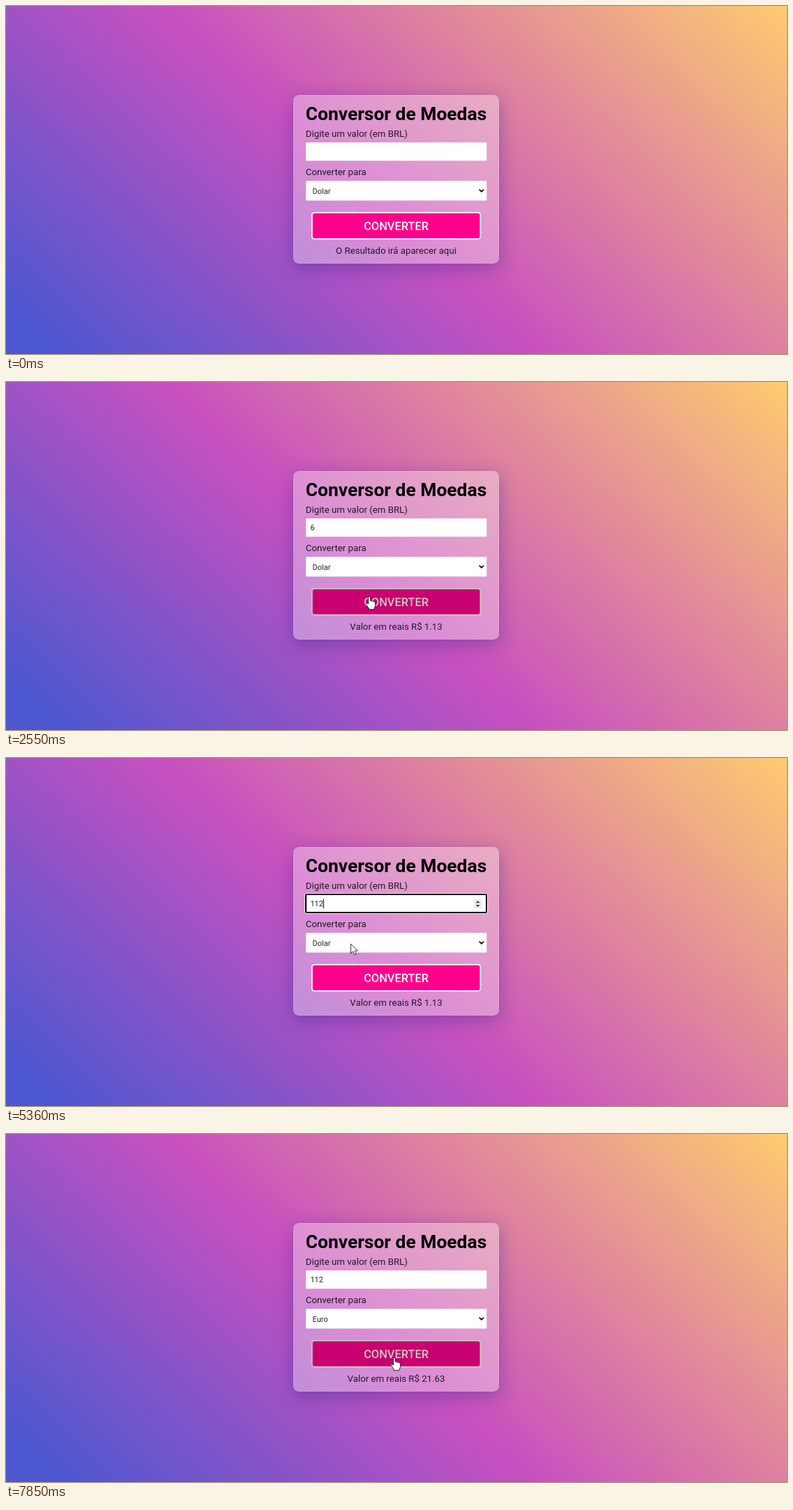
An HTML page that plays this animation: 1120x500 px, repeating every 8 s.

```html
<!DOCTYPE html>
<html lang="pt-BR">
<head>
<meta charset="utf-8">
<title>Conversor de Moedas</title>
<style>
  html, body { margin: 0; width: 100%; height: 100%; overflow: hidden; }
  #stage {
    position: relative; width: 1120px; height: 500px; overflow: hidden;
    background: linear-gradient(43deg, #4d57cf 5%, #c850c0 46%, #fdc971 99%);
  }
  #card {
    position: absolute; left: 412px; top: 128px; width: 295px; height: 242px;
    box-sizing: border-box; border: 1px solid rgba(255, 255, 255, .18); border-radius: 8.2px;
    background: rgba(255, 255, 255, .35);
    box-shadow: 0 6.6px 26px rgba(31, 38, 135, .37);
  }
  svg { position: absolute; left: 0; top: 0; }
  text { font: 13.24px Roboto, sans-serif; fill: rgba(0, 0, 0, .84); }
  .title { font-size: 26.4px; font-weight: 700; fill: #000; }
  .field { font-size: 11px; fill: #222; }
  .action { font-size: 16.4px; font-weight: 500; fill: #fff; }
  .mid { text-anchor: middle; }
  .picked { fill: #fff; font-weight: 500; }
  .focus { fill: none; stroke: #000; stroke-width: 2; }
  .halo { fill: none; stroke: #fff; stroke-opacity: .7; }
  #list { filter: drop-shadow(0 1px 1.5px rgba(0, 0, 0, .45)); }
</style>
</head>
<body>
<div id="stage">
  <div id="card"></div>
  <svg width="1120" height="500" viewBox="0 0 1120 500">
    <text class="title" x="429.8" y="163.6">Conversor de Moedas</text>
    <text x="429.8" y="187.6">Digite um valor (em BRL)</text>
    <rect x="430" y="196" width="259.3" height="26.3" fill="#fff"/>
    <rect id="selection" x="436.3" y="202.5" width="6.6" height="13.5" fill="#0078d7"/>
    <text id="amount" class="field" x="436.4" y="213.3"></text>
    <g id="inputFocus">
      <rect class="halo" x="428.5" y="194.5" width="262" height="29" rx="2.5"/>
      <rect class="focus" x="430" y="196" width="259" height="26" rx="1.2"/>
      <rect x="671" y="203" width="11.5" height="13" fill="#ececf0"/>
      <path d="M673.6 208.2L676.6 205L679.6 208.2ZM673.6 211L676.6 214.2L679.6 211Z" fill="#444"/>
      <rect id="caret" y="202.5" width="1" height="13.5"/>
    </g>

    <text x="429.8" y="243">Converter para</text>
    <rect x="430" y="251.2" width="259.3" height="28.3" fill="#fff"/>
    <text id="currency" class="field" x="439.6" y="269.6"></text>
    <path d="M678.7 263.7l3.2 3.2l3.2-3.2" fill="none" stroke="#000" stroke-width="1.7"/>
    <g id="selectFocus">
      <rect class="halo" x="428.5" y="250.5" width="262" height="30" rx="2.5"/>
      <rect class="focus" x="430" y="252" width="259" height="27" rx="1.2"/>
    </g>

    <g id="button">
      <rect x="438.8" y="296.8" width="241.6" height="37.9" rx="3.4" fill="#ff008c" stroke="#fff" stroke-width="1.7"/>
      <text class="action mid" x="559.6" y="321.8">CONVERTER</text>
    </g>
    <text id="result" class="mid" x="559.5" y="356.2"></text>

    <g id="list">
      <rect x="430" y="279.7" width="259" height="28.6" fill="#fff" stroke="#777" stroke-width=".6"/>
      <rect id="highlight" x="430.4" width="258.2" height="14.2" fill="#1e90ff"/>
      <text id="dollarOption" class="field" x="441" y="290.4">Dolar</text>
      <text id="euroOption" class="field" x="441" y="304.4">Euro</text>
    </g>

    <g id="cursor">
      <circle id="press" cy="-1" r="10" fill="#fff200" fill-opacity=".55"/>
      <path id="arrow" d="M0 0V13.8L3.2 10.9L5.3 15.7L7.7 14.7L5.6 10H10Z" fill="#fff" stroke="#000" stroke-width=".8"/>
      <path id="beam" d="M-3-6.5H-.7L0-5.9L.7-6.5H3M0-5.9V6M-3 6.6H-.7L0 6L.7 6.6H3" fill="none" stroke="#111" stroke-width="1.1"/>
      <path id="hand" d="M-1.5 1.6Q-1.5 0 0 0T1.5 1.6V6.4Q2.9 5.6 4 7Q5.4 6.2 6.3 7.6Q8.6 7.2 8.6 9.5V12.5Q8.6 15 7.2 16.5V18.7H-.8V17Q-2 15.8-3.2 13.5L-5 11Q-5.4 9.2-3.6 9.3L-1.5 11Z" fill="#fff" stroke="#111" stroke-width=".9"/>
    </g>
  </svg>
</div>
<script>
const LOOP = 8000, PRESS = 150, KEY_GAP = 67, BLINK = 500, FADE = 250, DIGIT = 6.14;
const el = Object.fromEntries([...document.querySelectorAll("[id]")].map(n => [n.id, n]));

// What the user does, and when
const at = {
  enter: 390, focus: 950, typeFirst: 1570, convert: 2330, refocus: 4000,
  drag: 4570, release: 4970, typeSecond: 5030, open: 6280, hoverEuro: 6550, pick: 6950, convertAgain: 7600
};
const clicks = [at.focus, at.convert, at.refocus, at.open, at.convertAgain];

// Pointer moves, each easing on from where the last one ended
const entry = { x: 951, y: 470 };
const moves = [
  { start: at.enter, ms: 560, x: 508.5, y: 213.5 },
  { start: 1640, ms: 560, x: 521, y: 308 },
  { start: 2880, ms: 250, x: 527, y: 331 },
  { start: 3130, ms: 510, x: 513, y: 256 },
  { start: 3700, ms: 300, x: 484, y: 214.5 },
  { start: at.drag, ms: 200, x: 421, y: 213.5 },
  { start: at.release, ms: 200, x: 494.5, y: 267 },
  { start: 6430, ms: 100, x: 490, y: 297 },
  { start: 6900, ms: 60, x: 495.5, y: 299 },
  { start: 7310, ms: 270, x: 557, y: 321 }
];

const between = (t, a, b) => t >= a && t < b;
const smooth = p => p * p * (3 - 2 * p);
const typed = (word, start, t) => word.slice(0, Math.max(0, Math.floor((t - start) / KEY_GAP) + 1));
const show = (node, on) => node.setAttribute("visibility", on ? "inherit" : "hidden");
const label = (node, s) => { if (node.textContent !== s) node.textContent = s; };
const listOpen = t => between(t, at.open, at.pick);

function pointer(t) {
  return moves.reduce((from, { start, ms, x, y }) => {
    const p = smooth(Math.min(1, Math.max(0, (t - start) / ms)));
    return { x: from.x + (x - from.x) * p, y: from.y + (y - from.y) * p };
  }, entry);
}

function pointerKind(t) {
  const { x, y } = pointer(t);
  if (between(t, at.drag, at.release)) return "beam";
  if (listOpen(t)) return "arrow";
  if (between(x, 430, 689) && between(y, 196, 222)) return "beam";
  return between(x, 438, 681) && between(y, 296, 335) ? "hand" : "arrow";
}

// The button darkens by the share of the last moments spent over it.
function hoverShare(t, samples = 10) {
  let over = 0;
  for (let i = 1; i <= samples; i++) over += pointerKind(t - i * FADE / samples) === "hand";
  return over / samples;
}

function caretOn(t) {
  const lastKey = at.typeSecond + 2 * KEY_GAP;
  const reset = [at.focus, at.typeFirst, at.refocus, lastKey].filter(start => t >= start).pop();
  return Math.floor((t - reset) / BLINK) % 2 === 0;
}

function draw(t) {
  const amount = t < at.typeSecond ? typed("6", at.typeFirst, t) : typed("112", at.typeSecond, t);
  label(el.amount, amount);
  label(el.currency, t < at.pick ? "Dolar" : "Euro");
  label(el.result, t < at.convert + PRESS ? "O Resultado irá aparecer aqui"
    : "Valor em reais R$ " + (t < at.convertAgain + PRESS ? "1.13" : "21.63"));

  const selecting = between(t, at.drag + 90, at.typeSecond);
  const typing = between(t, at.typeSecond, at.typeSecond + 2 * KEY_GAP);
  show(el.selection, selecting);
  el.amount.classList.toggle("picked", selecting);
  show(el.inputFocus, between(t, at.focus, at.convert) || between(t, at.refocus, at.open + PRESS));
  show(el.caret, !selecting && (typing || caretOn(t)));
  el.caret.setAttribute("x", 436.4 + amount.length * DIGIT);
  show(el.selectFocus, between(t, at.pick, at.convertAgain));

  const onEuro = t >= at.hoverEuro;
  show(el.list, listOpen(t));
  el.highlight.setAttribute("y", onEuro ? 294 : 280);
  el.dollarOption.classList.toggle("picked", !onEuro);
  el.euroOption.classList.toggle("picked", onEuro);

  el.button.style.filter = `brightness(${1 - .21 * hoverShare(t)})`;

  const { x, y } = pointer(t), kind = pointerKind(t);
  el.cursor.setAttribute("transform", `translate(${x} ${y})`);
  show(el.cursor, t >= at.enter);
  show(el.press, between(t, at.drag, at.release) || clicks.some(c => between(t, c, c + PRESS)));
  for (const name of ["arrow", "beam", "hand"]) show(el[name], name === kind);
}

const begin = performance.now();
function tick() {
  draw((performance.now() - begin) % LOOP);
  requestAnimationFrame(tick);
}
tick();
</script>
</body>
</html>
```
